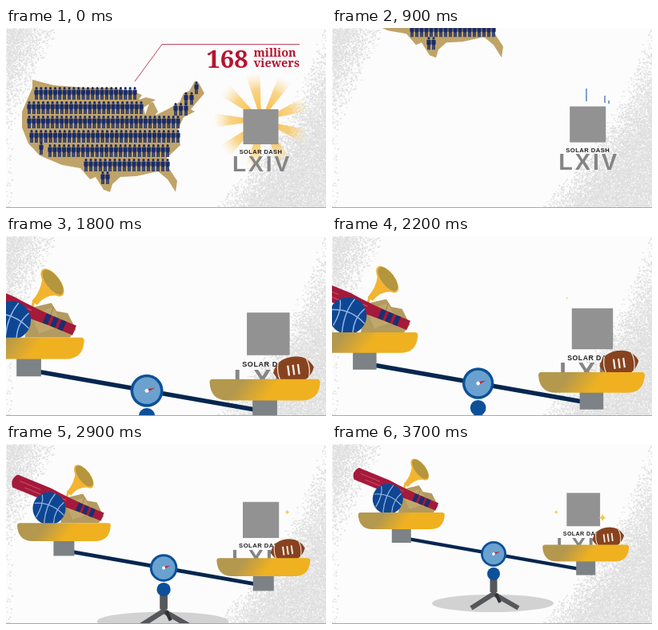
Write an HTML page with a canvas that moves like this. It is 400 px wide and 226 px high and loops after 3800 ms.

```html
<!DOCTYPE html>
<html lang="en">
<head>
<meta charset="utf-8">
<title>Viewers on the scale</title>
<style>
html, body { margin: 0; width: 100%; height: 100%; overflow: hidden; background: #fcfcfc; }
canvas, svg { position: absolute; inset: 0; width: 100%; height: 100%; display: block; }
.slab { font-family: "Noto Serif", serif; font-weight: 900; fill: #b5142f; }
.sans { font-family: "Liberation Sans", Arial, sans-serif; font-weight: 700; text-anchor: middle; }
</style>
</head>
<body>
<canvas id="paper" width="800" height="452"></canvas>
<svg viewBox="0 0 400 226" preserveAspectRatio="none">
  <defs>
    <radialGradient id="glow" gradientUnits="userSpaceOnUse" cx="0" cy="0" r="60">
      <stop offset=".2" stop-color="#f6b93c"/>
      <stop offset=".65" stop-color="#f8c763" stop-opacity=".85"/>
      <stop offset="1" stop-color="#fbdc9a" stop-opacity="0"/>
    </radialGradient>
    <linearGradient id="gold" x1="0" y1="0" x2="1" y2=".15">
      <stop offset=".3" stop-color="#b3984e"/>
      <stop offset=".62" stop-color="#efb120"/>
    </linearGradient>
    <g id="man" fill="#1a2c68">
      <circle cx="0" cy="1.7" r="1.6"/>
      <path d="M-1.6 3.6H1.6Q2.6 3.6 2.6 4.7V9.6H1.8V16H.25V10.5H-.25V16H-1.8V9.6H-2.6V4.7Q-2.6 3.6-1.6 3.6Z"/>
    </g>
    <g id="dish">
      <rect x="-12" y="18" width="24" height="20" fill="#7d8286"/>
      <path d="M-51 0H51Q54 0 54 3Q53 21 36 21H-36Q-53 21-54 3Q-54 0-51 0Z" fill="url(#gold)"/>
    </g>
    <path id="star" d="M0-5Q.7-.7 5 0Q.7.7 0 5Q-.7.7-5 0Q-.7-.7 0-5Z" fill="#f7c64f"/>
  </defs>

  <g id="rays" fill="url(#glow)"></g>

  <g id="chart">
    <path fill="#c0a369" d="M33 65L60 72L100 75H133L162 81L170 84L166 90L175 87L187 90L172 100L174 109L179 95L184 93L190 105L186 110L204 101L217 93L222 82L229 79L236 67L241 69L248 82L231 102L236 105L222 112L214 130L218 147L201 163V172L214 192L212 206L202 190L190 180L163 186L143 187L133 196L130 206L122 203L112 187L105 190L93 176L70 172L42 160L28 145L20 125V105L33 75Z"/>
    <g id="crowd"></g>
  </g>
  <g id="title">
    <path d="M161 67L195 20.5H367" fill="none" stroke="#b5304a" stroke-width=".9"/>
    <text class="slab" x="250.5" y="50" font-size="31">168</text>
    <text class="slab" x="309.5" y="35.5" font-size="14.5">million</text>
    <text class="slab" x="309.5" y="48.5" font-size="14.5">viewers</text>
  </g>

  <path id="streaks" d="M318 76V92M341 85V94M346 91V95" stroke="#4470b0" stroke-width="1.3"/>

  <g id="base">
    <ellipse cx="-1" cy="62" rx="76" ry="11" fill="#d2d2d2"/>
    <path d="M0 30V50L-28 68M0 50L31 68" fill="none" stroke="#55575a" stroke-width="6"/>
    <path d="M0 28V48" stroke="#55575a" stroke-width="9"/>
    <path d="M3 50L8 61" stroke="#303235" stroke-width="4"/>
    <circle cy="25" r="8" fill="#0c5099"/>
    <path id="beam" d="M-117 0H117" stroke="#06264f" stroke-width="4.4"/>
    <circle r="16" fill="#0c5099"/>
    <circle r="13.2" fill="#6ba1cf"/>
    <g id="needle"><path d="M-1.5 0L0-8.5L1.5 0Z" fill="#c21f3a"/><circle r="1.9" fill="#fff"/></g>
  </g>

  <g id="left">
    <g id="goods">
      <path d="M13-67Q15-49 3-36L8-32Q17-44 33-41Z" fill="#f2b431"/>
      <ellipse cx="23" cy="-54" rx="7.5" ry="16" transform="rotate(-37 23 -54)" fill="#f2b431"/>
      <ellipse cx="23.5" cy="-54.5" rx="6.5" ry="14.5" transform="rotate(-37 23.5 -54.5)" fill="#b4963f"/>
      <path d="M5-36Q1-24 8-28L19-31" fill="none" stroke="#f2b431" stroke-width="2.5"/>
      <path d="M-4 0L0-17L5-30L22-34L27-26L38-24L46-8L40 0Z" fill="#b39b5f"/>
      <path d="M2-22L24-30L32-12L10-4Z" fill="#c0a86c"/>
      <path d="M2-22L20-18L24-30" fill="none" stroke="#94804b" stroke-width=".8"/>
      <g transform="translate(-59 -50) rotate(22.5)">
        <path d="M3-8Q-4 0 3 8H45Q70 5 101 5H112V-5H101Q70-5 45-8Z" fill="#a5193b"/>
        <path d="M8-2H34M16 3H52M42-2H66" stroke="#d0556b" stroke-width=".8"/>
        <path d="M83-5V5M91-5V5M99-5V5" stroke="#1c2f6e" stroke-width="5"/>
      </g>
      <g transform="translate(-17 -17)" fill="none" stroke="#8fb5e0" stroke-width="1.2">
        <circle r="19" fill="#0f4693" stroke="none"/>
        <path d="M-17-6Q2-8 17 8M-6 17Q-4-4 7-17M-15 10Q-6-5-8-16M5 17Q6 2 17-7"/>
      </g>
    </g>
    <use href="#dish"/>
  </g>

  <g id="prize">
    <rect x="-22" y="4" width="44" height="44" fill="#929292"/>
    <text class="sans" x="0" y="60" font-size="7.5" letter-spacing=".4" fill="#222">SOLAR DASH</text>
    <text class="sans" x="1.5" y="82" font-size="28" letter-spacing="3" fill="#858585">LXIV</text>
  </g>

  <g id="right">
    <g id="ball">
      <g transform="translate(28 -9) rotate(-8)">
        <path d="M-20 0Q-15-13 0-13Q15-13 20 0Q15 13 0 13Q-15 13-20 0Z" fill="#87431f"/>
        <path d="M-5-5V5M0-5V5M5-5V5" stroke="#f6eee6" stroke-width="1.8"/>
        <path d="M14-9Q17 0 14 9M-14-9Q-17 0-14 9" fill="none" stroke="#f0e6da"/>
      </g>
    </g>
    <use href="#dish"/>
  </g>
  <g id="sparks"></g>
  <path d="M0 225.5H400" stroke="#a9a9a9"/>
</svg>
<script>
const LOOP = 3800, STEP = 100;
const $ = id => document.getElementById(id);
const clamp = v => Math.max(0, Math.min(1, v));
const mix = (a, b, k) => a + (b - a) * k;
// Progress from 0 to 1, starting at a moment and lasting a while
const part = (t, from, span) => clamp((t - from) / span);
const ease = (t, from, span) => (1 - Math.cos(Math.PI * part(t, from, span))) / 2;

const place = (el, x, y, s = 1) => el.setAttribute('transform', `translate(${x} ${y}) scale(${s})`);
const turn = (id, deg) => $(id).setAttribute('transform', `rotate(${deg})`);
const show = (on, ...ids) => ids.forEach(id => { $(id).style.display = on ? '' : 'none'; });

// Speckled paper edges
function paint() {
  const g = $('paper').getContext('2d');
  let seed = 49;
  const rnd = () => (seed = (seed * 16807) % 2147483647) / 2147483647;
  g.scale(2, 2);
  for (let y = 0; y < 226; y += 1.2) {
    const l = Math.max(8, 65 - .45 * y), r = 392 - .25 * y - .0016 * y * y;
    for (let x = 0; x < 400; x += 1.2) {
      const p = Math.max((l - x) / 60, (x - r) / 60);
      if (p > 0 && rnd() < Math.min(.85, p)) {
        g.fillStyle = rnd() < .5 ? '#dcdcdc' : '#e4e4e4';
        const d = 1 + rnd();
        g.fillRect(x + rnd(), y + rnd(), d, d);
      }
    }
  }
}

function crowd() {
  let out = '';
  const row = (x, end, y) => {
    const n = Math.round((end - x) / 5.9);
    for (let i = 0; i <= n; i++) out += `<use href="#man" x="${n ? mix(x, end, i / n) : x}" y="${y}"/>`;
  };
  const spans = [[38, 161], [29, 169], [29, 215], [32, 215], [55, 202], [100, 202]];
  spans.forEach(([a, b], i) => row(a, b, 74 + 18 * i));
  row(44, 44, 143);
  row(121, 127, 180);
  for (let i = 0; i < 3; i++) row(212 + 13 * i, 225 + 7 * i, 94 - 13.5 * i);
  return out;
}

// Sparkles: time, offset from the prize, size
const sparks = [[2200, -32, -8, .3], [2900, 33, 17, .6], [3700, 24, 35, 1], [3650, -34, 28, .6]];

function draw(t) {
  // Chart leaves upwards, rays fade
  const up = -260 * part(t, 600, 400) ** 1.5;
  place($('chart'), 0, up);
  place($('title'), 0, up);
  show(t < 1000, 'chart', 'title');
  $('rays').setAttribute('transform', `translate(319 116) rotate(${20 + t / 100})`);
  $('rays').style.opacity = .9 * (1 - part(t, 0, 800));
  show(t >= 800 && t <= 1000, 'streaks');
  place($('streaks'), 0, (t - 900) * .2);

  // Scale rises, tips over and shrinks as the view widens
  const drop = (1 - part(t, 1200, 300)) ** 2;
  const s = 1.286 - .286 * ease(t, 1620, 2000);
  const x = 174 + 28 * ease(t, 1450, 2000);
  const y = 195 - 57 * ease(t, 1650, 2000);
  const deg = 10 * ease(t, 1300, 500), a = deg * Math.PI / 180;
  const dx = 117 * Math.cos(a) * s, dy = 117 * Math.sin(a) * s;
  const sink = 110 * drop, top = y - 31.7 * s;
  show(t >= 1300, 'base', 'left', 'right');
  place($('base'), x, y + sink, s);
  turn('beam', deg);
  turn('needle', 7 * deg);
  place($('left'), x - dx, top - dy + sink, s);
  place($('right'), x + dx, top + dy + sink, s);
  place($('goods'), 0, -60 * drop);
  place($('ball'), 0, -70 * drop);

  // Prize moves from its spot to the right dish
  const k = part(t, 600, 900) ** 2;
  const px = mix(318.5, x + dx + s * (4 - 7 * ease(t, 1500, 1500)), k);
  const py = mix(98, top + dy - 69 * s, k);
  place($('prize'), px, py, mix(1, .95 * s, k));

  sparks.forEach(([when, ox, oy, size], i) => {
    const pulse = clamp(1 - Math.abs(t - when) / 300);
    place($('sparks').children[i], px + ox, py + oy, size * pulse);
  });
}

paint();
$('crowd').innerHTML = crowd();
$('rays').innerHTML = Array.from({ length: 9 }, (_, i) => `<path d="M0 0L60-9V9Z" transform="rotate(${i * 40})"/>`).join('');
$('sparks').innerHTML = '<use href="#star"/>'.repeat(sparks.length);

const start = performance.now();
function tick() {
  const t = (performance.now() - start) % LOOP;
  draw(Math.floor(t / STEP) * STEP);
  requestAnimationFrame(tick);
}
tick();
</script>
</body>
</html>
```
